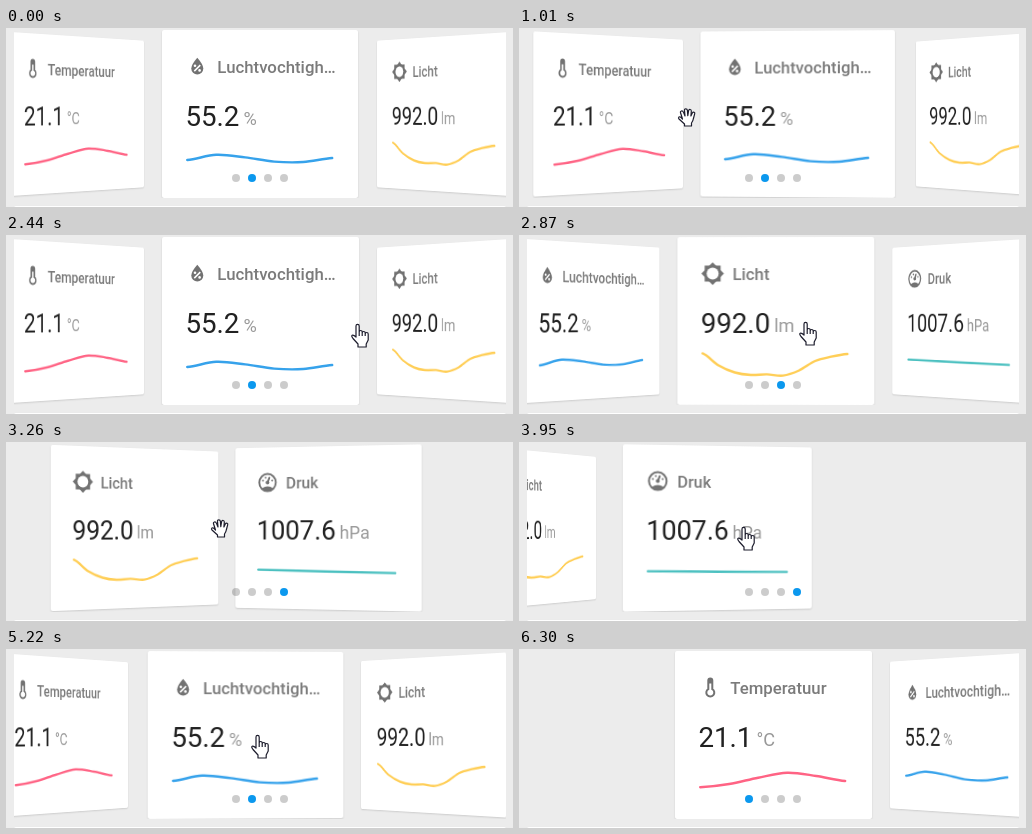
These frames come from a looping animation (507 by 179 pixels, 6950 ms). An HTML page:

```html
<!DOCTYPE html>
<html lang="nl">
<head>
<meta charset="utf-8">
<title>Sensorkaarten</title>
<style>
  html, body { margin: 0; width: 100%; height: 100%; overflow: hidden; background: #ececec; }
  body { position: relative; font-family: Roboto, "Liberation Sans", sans-serif; }
  .swiper, .next, #cursor, .dots { position: absolute; }
  .swiper { left: 8px; top: 2px; width: 492px; height: 168px; overflow: hidden; perspective: 1200px; }
  .card, .next { background: #fff; border-radius: 2px; box-shadow: 0 1px 2px rgba(0,0,0,.14); }
  .card { position: absolute; left: 147.6px; top: 0; width: 196.8px; height: 168px; }
  .next { left: 8px; top: 178px; width: 492px; height: 40px; }
  .icon { fill: #727272; }
  .icon .stroke { fill: none; stroke: #727272; stroke-width: 2; }
  .icon .hole { fill: #fff; }
  .icon .slash { stroke: #fff; stroke-width: 1.5; }
  .name { font-size: 16.8px; font-weight: 500; fill: #7b7b7b; }
  .value { font-size: 27.7px; fill: #212121; }
  .unit { font-size: 18.2px; fill: #999; }
  .line { fill: none; stroke-width: 2.4; stroke-linecap: round; }
  .dots { left: 226px; top: 146px; display: flex; gap: 8px; }
  .dots i { width: 8px; height: 8px; border-radius: 50%; background: rgba(0,0,0,.2); }
  .dots i.on { background: #0b98ee; }
  #cursor { left: 0; top: 0; overflow: visible; fill: #fff; stroke: #1c1c2c; stroke-width: 1.2; stroke-linejoin: round; }
</style>
</head>
<body>
<div class="swiper"></div>
<div class="next"></div>
<div class="dots"><i></i><i></i><i></i><i></i></div>
<svg id="cursor" width="20" height="26">
  <path id="point" d="M5 13V2a1.6 1.6 0 0 1 3.2 0V8a1.5 1.5 0 0 1 3 0V9a1.5 1.5 0 0 1 3 0v1a1.5 1.5 0 0 1 3 0V16l-2 4v3H7V20L2 14.5Q0 12 1.2 11.3T5 13ZM8.2 8v4M11.2 9v3M14.2 10v2"/>
  <path id="grab" d="M4.5 11L2.6 5Q2 3.4 3.4 3T5.6 4.6L7 8 6.5 2.4Q6.4 .8 7.8 .8T9.4 2.4L9.8 7.6 10.6 2.6Q11 1.2 12.2 1.5T13.3 3.2L12.9 8 14.3 5Q15 3.8 16.1 4.3T16.6 6.2L15.3 11Q15 13 13.5 15V18H6.5V16L1 11Q0 10 1 9T4.5 11Z"/>
</svg>
<script>
const W = 196.8, LOOP = 6950, SETTLE = 300;

// Heights are evenly spaced samples of the graph
const sensors = [
  { name: 'Temperatuur', value: '21.1', unit: '°C', color: '#ff6384',
    heights: [136.3, 133, 126.7, 121.8, 125, 130],
    icon: '<path class="stroke" d="M10 13.5V5a2 2 0 0 1 4 0v8.5a4 4 0 1 1-4 0ZM12 4v4"/>' },
  { name: 'Luchtvochtigh…', value: '55.2', unit: '%', color: '#36a2eb',
    heights: [130, 124.8, 127.4, 131.6, 132, 128],
    icon: `<path d="M12 3.2Q6 10 6 14a6 6 0 0 0 12 0Q18 10 12 3.2"/><path class="slash" d="M15 10.5l-6 6"/>
      <circle class="hole" cx="9.7" cy="11.2" r="1.3"/><circle class="hole" cx="14.3" cy="15.8" r="1.3"/>` },
  { name: 'Licht', value: '992.0', unit: 'lm', color: '#ffce56',
    heights: [116.5, 128.5, 135.5, 138, 137.4, 138.6, 133.5, 124, 119.7, 117],
    icon: `<path id="sq" d="M4 4h16v16H4z"/><path d="M4 4h16v16H4z" transform="rotate(45 12 12)"/>
      <circle class="hole" cx="12" cy="12" r="6"/>` },
  { name: 'Druk', value: '1007.6', unit: 'hPa', color: '#4bc0c0',
    heights: [127.6, 128.8, 129.6],
    icon: `<circle class="stroke" cx="12" cy="12" r="9"/><path d="M6 18q6-4 12 0q-6 6-12 0"/>
      <path class="stroke" stroke-linecap="round" d="M12 12l2-5M10 7h0M7 10h0M17 10h0"/><circle cx="12" cy="12" r="2"/>` },
];

// Press time, release time, slide it leads to, pointer x at press and release
const drags = [
  [950, 1200, 0, 144, 302],
  [1960, 2130, 1, 361, 235],
  [2470, 2640, 2, 353, 225],
  [3090, 3270, 3, 343, 213],
  [3690, 3920, 3, 354, 226],
  [4360, 4540, 2, 100, 228],
  [4860, 5075, 1, 121, 249],
  [5650, 5850, 0, 260, 384],
].map(([press, release, to, x0, x1], i, all) =>
  ({ press, release, to, x0, x1, from: i ? all[i - 1][2] : 1 }));

// The pointer travels on to the next press after each release
const stops = [[430, 234, 178], [800, drags[0].x0, 84]];
drags.forEach((d, i) => {
  const next = drags[i + 1];
  stops.push([d.press, d.x0, 90], [d.release, d.x1, 86]);
  if (next) stops.push([Math.min(next.press, d.release + 550), next.x0, 90]);
});
stops.push([6290, 395, 182]);

// Smooth curve through evenly spaced heights
function curve(ys) {
  const step = 145 / (ys.length - 1);
  const slope = i => ((ys[i + 1] ?? ys[i]) - (ys[i - 1] ?? ys[i])) / 6;
  return ys.map((y, i) => {
    const x = 25.2 + i * step;
    return i ? `C${x - step * 2 / 3} ${ys[i - 1] + slope(i - 1)} ${x - step / 3} ${y - slope(i)} ${x} ${y}` : `M${x} ${y}`;
  }).join('');
}

// The CSS "ease" timing curve
function ease(x) {
  const bezier = (a, b, s) => 3 * (1 - s) ** 2 * s * a + 3 * (1 - s) * s * s * b + s ** 3;
  let lo = 0, hi = 1;
  for (let i = 0; i < 20; i++) {
    const mid = (lo + hi) / 2;
    if (bezier(.25, .25, mid) < x) lo = mid; else hi = mid;
  }
  return bezier(.1, 1, lo);
}

function pointer(t) {
  const i = stops.findIndex(s => s[0] > t);
  if (i < 1) return null;
  const [t0, x0, y0] = stops[i - 1], [t1, x1, y1] = stops[i];
  const u = (t - t0) / (t1 - t0), s = u * u * (3 - 2 * u);
  return [x0 + (x1 - x0) * s, y0 + (y1 - y0) * s];
}

// Slide position while held, with resistance past the last card
function dragged(drag, x) {
  const p = drag.from - (x - drag.x0) / W, over = p - 3;
  return over > 0 ? 3 + (over * W) ** .85 / W : p;
}

function position(t, drag) {
  if (!drag) return 1;
  if (t < drag.release) return dragged(drag, pointer(t)[0]);
  const start = dragged(drag, drag.x1);
  return start + (drag.to - start) * ease(Math.min(1, (t - drag.release) / SETTLE));
}

document.querySelector('.swiper').innerHTML = sensors.map(s => `
  <svg class="card" viewBox="0 0 196.8 168">
    <g class="icon" transform="translate(23.3 24.6)">${s.icon}</g>
    <text class="name" x="55.2" y="43">${s.name}</text>
    <text class="value" x="23.4" y="96">${s.value}<tspan class="unit" dx="4" dy="-.6">${s.unit}</tspan></text>
    <path class="line" stroke="${s.color}" d="${curve(s.heights)}"/>
  </svg>`).join('');

const cards = document.querySelectorAll('.card');
const dots = document.querySelectorAll('.dots i');
const [cursor, point, grab] = ['cursor', 'point', 'grab'].map(id => document.getElementById(id));

function draw(t) {
  const drag = drags.filter(d => d.press <= t).pop();
  const p = position(t, drag);
  cards.forEach((card, i) => {
    const o = i - p;
    card.style.transform = `translate3d(${o * W}px,0,${-100 * Math.abs(o)}px) rotateY(${-50 * o}deg)`;
    card.style.zIndex = 5 - Math.abs(Math.round(o));
  });
  const active = Math.max(0, Math.min(3, Math.round(p)));
  dots.forEach((dot, i) => dot.classList.toggle('on', i === active));

  const pos = pointer(t), held = drag && t < drag.release;
  cursor.style.display = pos ? '' : 'none';
  if (!pos) return;
  const [hx, hy] = held ? [9, 9] : [6, 1];
  cursor.style.transform = `translate(${Math.round(pos[0] - hx)}px,${Math.round(pos[1] - hy)}px)`;
  point.style.display = held ? 'none' : '';
  grab.style.display = held ? '' : 'none';
}

const begin = performance.now();
function tick() {
  draw((performance.now() - begin) % LOOP);
  requestAnimationFrame(tick);
}
tick();
</script>
</body>
</html>
```
